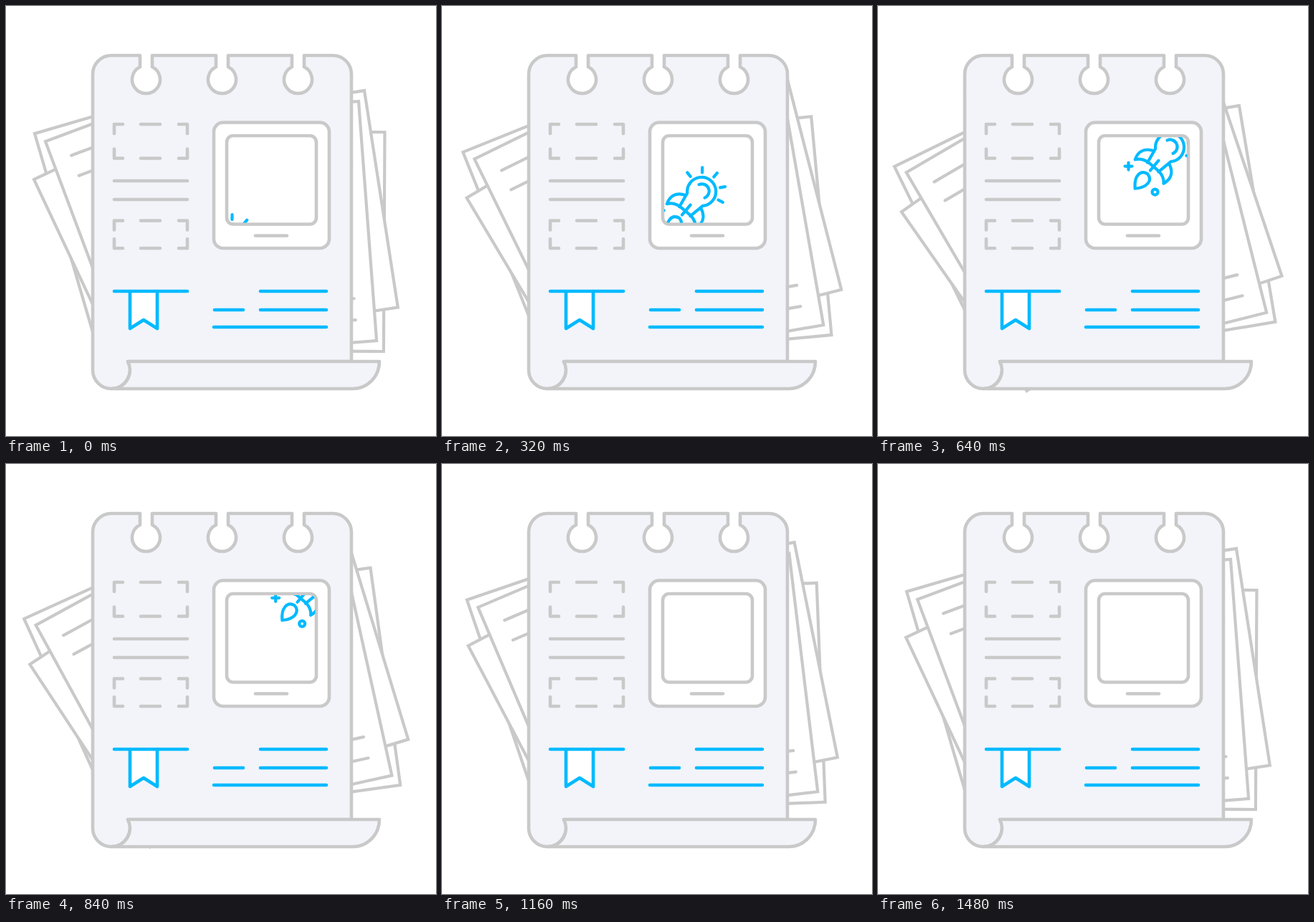
Animation of 600x600 px, one loop 2720 ms. Source, as an HTML page:

```html
<!DOCTYPE html>
<html lang="en">
<head>
<meta charset="utf-8">
<title>Notepad</title>
<style>
  html, body { margin: 0; width: 100%; height: 100%; overflow: hidden; background: #fff; }
  svg { display: block; width: 100vw; height: 100vh; }
  path, circle, rect { fill: none; stroke-width: 4.6; stroke-linecap: round; stroke-linejoin: round; }
  .grey { stroke: #c9c9c9; }
  .blue { stroke: #00baff; }
  .white { fill: #fff; }
  .pad { fill: #f2f4f9; }
  #pile path { stroke-width: 4.2; stroke-linejoin: miter; }
  #rocket path, #rocket circle { stroke: #00baff; stroke-width: 4.2; }
</style>
</head>
<body>
<svg viewBox="0 0 600 600">
  <clipPath id="photo"><rect x="310" y="183" width="121.500" height="119.500" rx="7"/></clipPath>

  <g id="pile"></g>

  <path class="white" d="M170 69H430V140H170z"/>
  <path id="page" class="grey pad"/>
  <path class="grey pad" d="M147 534H484A37 38 0 0 0 521 496H170A26 26 0 0 1 147 534z"/>

  <path id="boxes" class="grey"/>
  <path class="grey" d="M151 244H253M151 270H253"/>

  <rect class="grey white" x="290" y="162.500" width="161" height="175.500" rx="13"/>
  <rect class="grey white" x="308" y="181" width="125" height="123.500" rx="9"/>
  <path class="grey" d="M348 320.500H392"/>

  <path class="blue white" d="M173 398V450L192 438L211 450V398"/>
  <path class="blue" d="M151 398H253M355 398H447M291 424H331M355 424H447M290 448H447"/>

  <g clip-path="url(#photo)">
    <g id="rocket">
      <g transform="rotate(40)">
        <path d="M-10 37L-14 15A20 20 0 1 1 14 15L10 37"/>
        <path d="M-9 -4.500A10 10 0 0 1 9 4.500"/>
        <path d="M-14 19C-27 24 -30 34 -26 45C-22 39 -17 37 -10 36H10C17 37 22 39 26 45C30 34 27 24 14 19M0 25V43"/>
        <path d="M0 49C6 50 9 54 9 59C9 65 5 71 0 76C-5 71 -9 65 -9 59C-9 54 -6 50 0 49z"/>
        <path id="rays"/>
      </g>
      <path d="M-63 27H-53M-58 22V32"/>
      <circle cx="-21" cy="63" r="4"/>
    </g>
  </g>
</svg>
<script>
const el = id => document.getElementById(id);

// Loose sheets: x, y and tilt of the outer top corner, then width (negative runs left), height, text rows
function sheet(x, y, tilt, w, h, rows = []) {
  const side = Math.sign(w);
  const text = rows.map(v => `M${27 * side} ${v}H${120 * side}`).join('');
  return `<g transform="translate(${x} ${y}) rotate(${tilt})">
    <path class="grey white" d="M0 0h${w}v${h}h${-w}z"/><path class="grey" d="${text}"/></g>`;
}
el('pile').innerHTML =
  sheet(40, 178, -16.3, 180, 306) +
  sheet(39, 242, -25.2, 180, 305) +
  sheet(55, 189, -20.5, 180, 335, [31, 61]) +
  sheet(528.5, 176, 0.3, -180, 306) +
  sheet(500, 118, -8.8, -180, 306) +
  sheet(492, 133, -4.3, -180, 335, [274, 304]);

// Page with three ring holes along the top
const hole = x => `H${x - 8}V85A19.5 19.5 0 1 0 ${x + 9} 85V69`;
el('page').setAttribute('d',
  `M121 95A26 26 0 0 1 147 69${[195, 301, 407].map(hole).join('')}H456A26 26 0 0 1 482 95V496H170A26 26 0 0 1 147 534A26 26 0 0 1 121 508z`);

const box = (top, bottom) => [[top, 13], [bottom, -13]].map(([y, d]) =>
  `M151 ${y + d}V${y}H163M188 ${y}H215M241 ${y}H253V${y + d}`).join('');
el('boxes').setAttribute('d', box(165, 212.5) + box(299.5, 338));

el('rays').setAttribute('d', [-78, -39, 0, 39, 78].map(deg => {
  const a = deg * Math.PI / 180, s = Math.sin(a), c = -Math.cos(a);
  return `M${26 * s} ${26 * c}L${33 * s} ${33 * c}`;
}).join(''));

const LOOP = 2720, STEP = 40, END = 1480, PEAK = 660, SWING = 10;

function swing(t) {
  if (t < PEAK) {
    const x = t / PEAK;
    return 1.3 * x - 0.3 * x * x;
  }
  const y = (t - PEAK) / (END - PEAK);
  return Math.cos(Math.PI / 2 * y ** 0.83) ** 2;
}

function draw(now) {
  const t = Math.min(Math.floor(now % LOOP / STEP) * STEP, END);
  el('pile').setAttribute('transform', `rotate(${-SWING * swing(t)} 300 301)`);
  const rise = 0.211 * t - 0.0000185 * t * t;
  el('rocket').setAttribute('transform', `translate(${315 + 0.726 * rise} ${324 - rise})`);
  requestAnimationFrame(draw);
}
draw(0);
</script>
</body>
</html>
```
